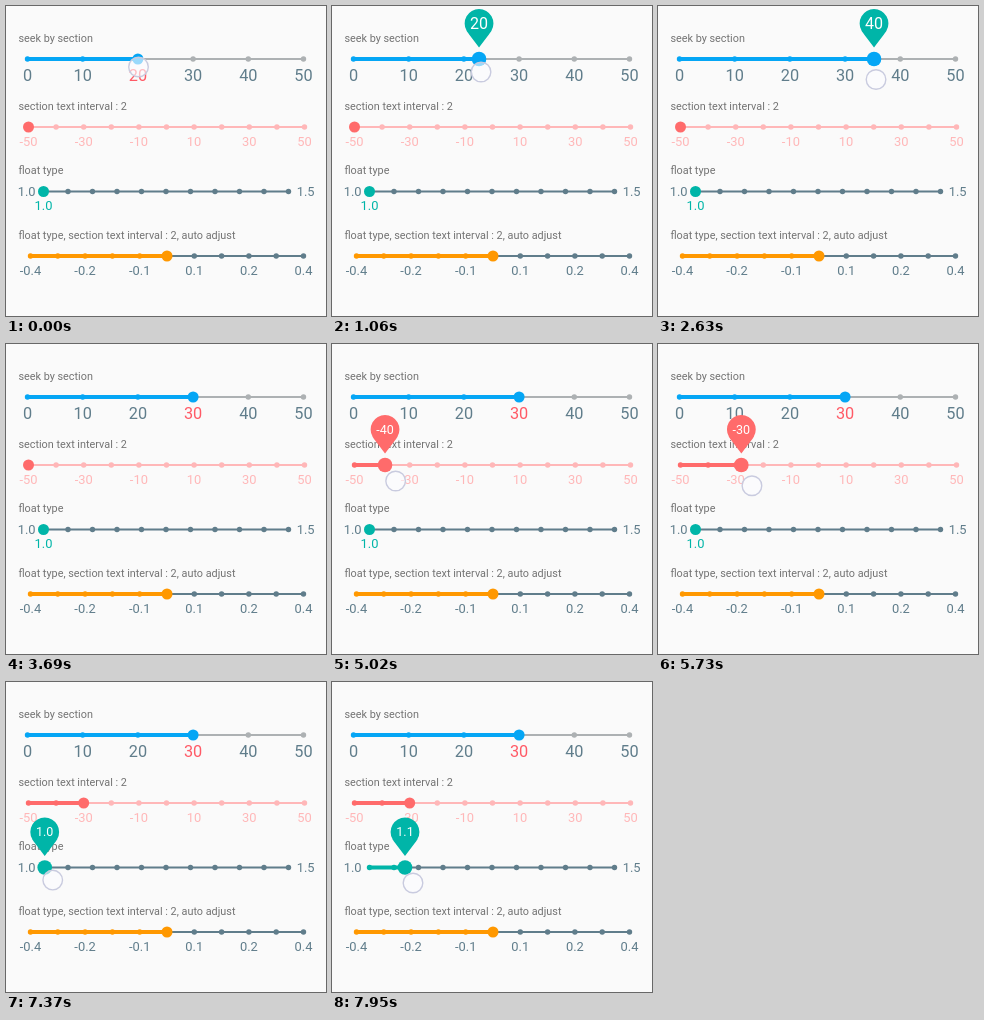
Animation of 320x310 px, one loop 8 s. Source, as an HTML page:

```html
<!DOCTYPE html>
<html lang="en">
<head>
<meta charset="utf-8">
<title>Seek bars</title>
<style>
html, body { margin: 0; width: 100%; height: 100%; overflow: hidden; background: #fafafa; }
svg { display: block; width: 100%; height: 100%; font-family: Roboto, Arial, sans-serif; }
</style>
</head>
<body>
<svg id="stage" viewBox="0 0 320 310"></svg>
<script>
const LOOP = 8000, FADE = 200, R = 14.4;
const SLATE = '#607d8b', TEAL = '#00b5a8', RED = '#ff6b6b', PINK = '#ffb7b8';
const stage = document.getElementById('stage');

function add(parent, name, attrs, text) {
  const node = document.createElementNS('http://www.w3.org/2000/svg', name);
  set(node, attrs);
  if (text !== undefined) node.textContent = text;
  parent.append(node);
  return node;
}
function set(node, attrs) {
  for (const key in attrs) node.setAttribute(key, attrs[key]);
}
const label = (parent, x, y, size, fill, text) =>
  add(parent, 'text', { x, y, 'font-size': size, fill, 'text-anchor': 'middle' }, text);
const clamp = v => Math.max(0, Math.min(1, v));

// Each key is [time, thumb x, finger y].
const bars = [
  {
    title: 'seek by section', titleY: 36, y: 53, left: 21.5, right: 297.5, parts: 5,
    color: '#05a6f5', rest: '#adb1b3', bubble: TEAL, bubbleSize: 16,
    textY: 74.6, textSize: 16.3, textColor: SLATE, texts: ['0', '10', '20', '30', '40', '50'],
    touch: 0, down: 60, up: 3460, snap: 187.1, dx: 2, picks: [2, 3],
    keys: [[60, 131.9, 61], [600, 131.9, 62], [1060, 147, 66], [1400, 160, 68], [2210, 195, 71],
           [2630, 216, 73.5], [2960, 225, 74], [3090, 225, 74.5], [3460, 206, 76]],
    value: p => Math.round(p * 5) * 10
  },
  {
    title: 'section text interval : 2', titleY: 104, y: 121, left: 22.5, right: 298.5, parts: 10,
    color: RED, rest: PINK, bubble: RED, bubbleSize: 12.5,
    textY: 139.8, textSize: 12.9, textColor: PINK, texts: ['-50', '-30', '-10', '10', '30', '50'],
    touch: 4220, down: 4220, up: 6500, snap: 77.7, dx: 10.6,
    keys: [[4220, 22.5, 131], [4400, 22.5, 132], [5020, 53, 137], [5840, 88, 142.5],
           [6110, 93.5, 143], [6260, 93.5, 143], [6470, 88, 143], [6500, 87, 143]],
    value: p => Math.round(p * 10) * 10 - 50
  },
  {
    title: 'float type', titleY: 168, y: 185.5, left: 37.5, right: 282.5, parts: 10,
    color: TEAL, rest: SLATE, bubble: TEAL, bubbleSize: 12.5,
    touch: 7100, down: 7100, up: Infinity, dx: 8,
    keys: [[7100, 37.5, 197], [7350, 37.5, 198], [7890, 69, 200.5], [7950, 73, 201]],
    value: p => (1 + p / 2).toFixed(1)
  },
  {
    title: 'float type, section text interval : 2, auto adjust', titleY: 233,
    y: 250, left: 24.5, right: 297.5, parts: 10, color: '#ff9800', rest: SLATE,
    textY: 268.8, textSize: 12.9, textColor: SLATE,
    texts: ['-0.4', '-0.2', '-0.1', '0.1', '0.2', '0.4'],
    touch: Infinity, down: Infinity, up: Infinity, keys: [[0, 161, 0]]
  }
];

function bubblePath() {
  const side = Math.sqrt(3) / 2 * R, y = 1.5 * R, tip = 8 / 3 * R, bend = 1.8;
  return `M0 ${tip}Q${-side - bend} ${y - bend} ${-side} ${y}` +
    `A${R} ${R} 0 1 1 ${side} ${y}Q${side + bend} ${y - bend} 0 ${tip}Z`;
}

function build(bar) {
  const { y, left, right, parts, color, rest } = bar;
  add(stage, 'text', { x: 12.4, y: bar.titleY, 'font-size': 10.85, fill: '#737373' }, bar.title);
  const line = (stroke, width) => add(stage, 'line', {
    x1: left, x2: right, y1: y, y2: y, stroke, 'stroke-width': width, 'stroke-linecap': 'round'
  });
  line(rest, 1.8);
  bar.fill = line(color, 3.9);
  bar.dots = Array.from({ length: parts + 1 }, (_, i) =>
    add(stage, 'circle', { cx: left + (right - left) * i / parts, cy: y, r: 2.7 }));
  bar.thumb = add(stage, 'circle', { cy: y, fill: color });

  if (bar.texts) {
    const gap = (right - left) / parts * (parts === 10 ? 2 : 1);
    bar.marks = bar.texts.map((s, i) =>
      label(stage, left + gap * i, bar.textY, bar.textSize, bar.textColor, s));
  } else {
    label(stage, 20.6, 190.3, 12.9, SLATE, '1.0');
    label(stage, 299.6, 190.3, 12.9, SLATE, '1.5');
    bar.below = label(stage, left, 204.4, 12.9, TEAL, '1.0');
  }
}

function buildBubble(bar) {
  if (!bar.bubble) return;
  bar.tag = add(stage, 'g', {});
  add(bar.tag, 'path', { d: bubblePath(), fill: bar.bubble });
  bar.tagText = label(bar.tag, 0, R + bar.bubbleSize * 0.355, bar.bubbleSize, '#fff', '');
}

function sample(keys, t) {
  if (t <= keys[0][0]) return keys[0].slice(1);
  for (let i = 1; i < keys.length; i++) {
    const a = keys[i - 1], b = keys[i];
    if (t <= b[0]) {
      const k = (t - a[0]) / (b[0] - a[0]);
      return [a[1] + (b[1] - a[1]) * k, a[2] + (b[2] - a[2]) * k];
    }
  }
  return keys[keys.length - 1].slice(1);
}

function draw(bar, t) {
  let [x, fingerY] = sample(bar.keys, t);
  if (t > bar.up) x += (bar.snap - x) * Math.sin(clamp((t - bar.up) / FADE) * Math.PI / 2);
  const active = t >= bar.down && t < bar.up + FADE;

  set(bar.fill, { x2: x, opacity: x > bar.left + 0.1 ? 1 : 0 });
  set(bar.thumb, { cx: x, r: active ? 7.3 : 5.5 });
  for (const dot of bar.dots)
    dot.setAttribute('fill', dot.getAttribute('cx') <= x ? bar.color : bar.rest);

  if (bar.picks) {
    const pick = active ? -1 : bar.picks[t < bar.down ? 0 : 1];
    bar.marks.forEach((m, i) => m.setAttribute('fill', i === pick ? '#ff5a66' : bar.textColor));
  }
  if (bar.below) bar.below.setAttribute('opacity', active ? 0 : 1);

  if (bar.tag) {
    const shown = clamp((t - bar.down) / FADE) * (1 - clamp((t - bar.up) / FADE));
    set(bar.tag, { transform: `translate(${x} ${bar.y - 50})`, opacity: shown });
    bar.tagText.textContent = bar.value((x - bar.left) / (bar.right - bar.left));
  }
  if (t >= bar.touch && t < bar.up)
    set(finger, { cx: x + (t < bar.down ? 0.6 : bar.dx), cy: fingerY, opacity: 1 });
}

bars.forEach(build);
bars.forEach(buildBubble);
const finger = add(stage, 'circle', {
  r: 9.8, fill: '#fcfcff', 'fill-opacity': 0.6, stroke: '#c9cbdf', 'stroke-width': 1.4
});

function tick() {
  const t = performance.now() % LOOP;
  finger.setAttribute('opacity', 0);
  for (const bar of bars) draw(bar, t);
  requestAnimationFrame(tick);
}
tick();
</script>
</body>
</html>
```
